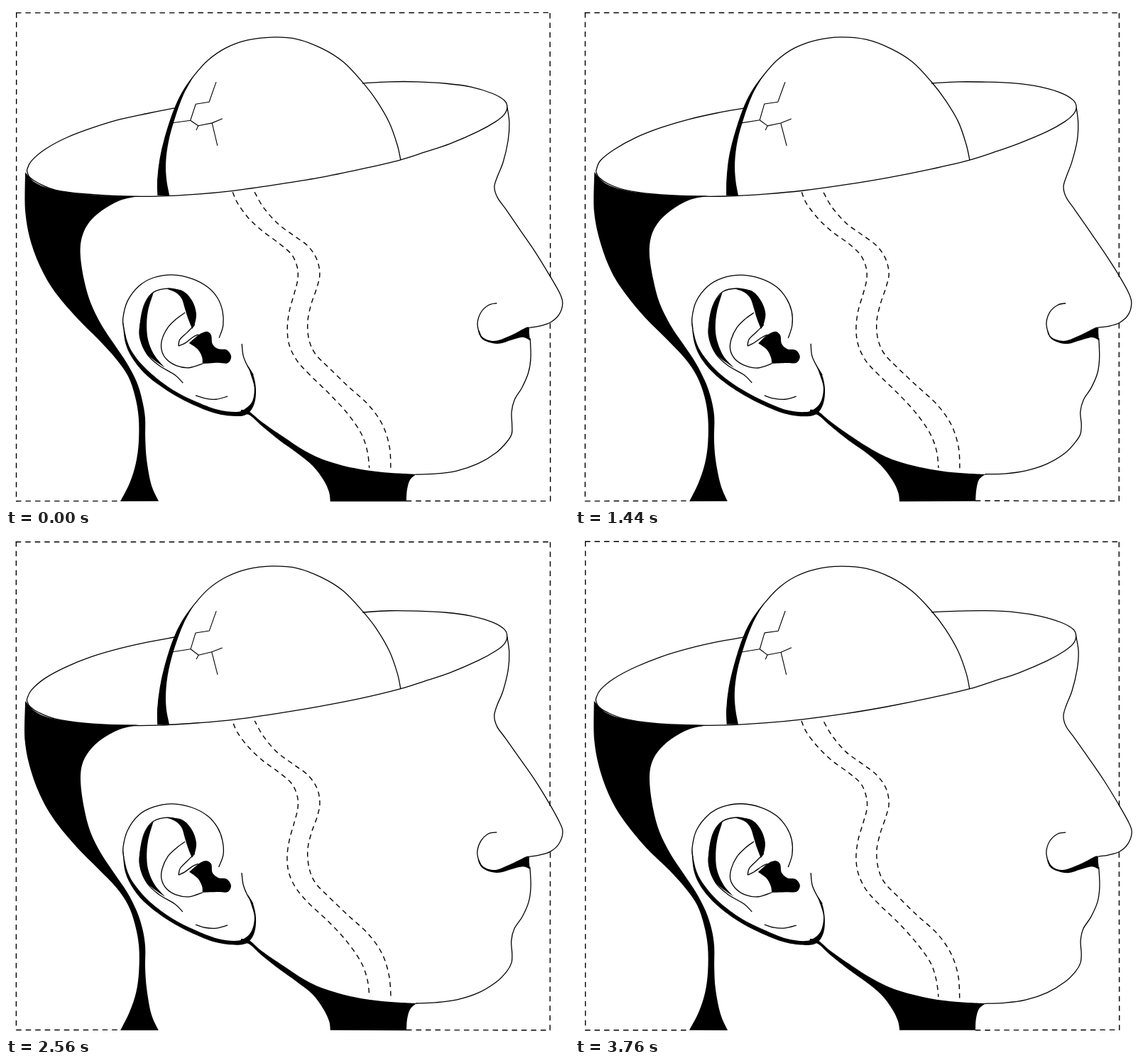
These frames come from a looping animation (793x706 px, 3840 ms). An HTML page with a canvas:

```html
<!DOCTYPE html>
<html lang="en">
<head>
<meta charset="utf-8">
<title>Open head</title>
<style>
html, body { margin: 0; width: 100%; height: 100%; overflow: hidden; background: #fff; }
canvas { display: block; }
</style>
</head>
<body>
<canvas id="stage" width="793" height="706"></canvas>
<script>
const ctx = document.getElementById('stage').getContext('2d');
const STEP = 80, STEPS = 48;

const points = text => text.trim().split(/\s+/).map(p => p.split(',').map(Number));

const lines = [
  // rim of the skull
  '237,144 200,151 160,160 120,172 85,186 55,202 36,218 30,230 30,235 34,242 46,250 70,259 110,265 165,268 215,268 270,265 320,260 380,252 440,242 500,230 555,217 590,206 625,194 665,177 690,163 702,153 706,143 702,133 685,123 655,114 620,109 580,107 540,107 502,109',
  // dome
  '214,267 214,245 217,215 224,185 236,148 248,122 265,98 285,76 310,59 340,48 374,44 410,47 445,60 475,79 502,107 522,133 540,164 551,195 556,217',
  // forehead and nose
  '706,143 709,165 707,190 700,220 692,240 688,255 692,270 704,287 723,314 745,346 765,378 780,405 784,419 779,435 767,446 752,451 737,453',
  // mouth and chin
  '738,468 739,495 736,517 727,538 716,555 712,572 713,590 712,603 705,615 690,630 665,645 635,655 605,659 577,660',
  // nostril
  '691,419 680,421 669,431 664,447 667,463',
  // ear
  '300,468 306,450 305,430 298,412 284,396 262,384 235,379 208,383 187,395 171,416 165,440 166,455',
  '332,476 334,493 340,507 348,520',
  '249,531 238,520 215,506 198,490 189,465 190,440 196,418 208,403 228,398 248,402',
  '252,432 240,441 228,453 220,470 219,485 226,498 240,507 258,510 277,504',
  '266,449 255,460 245,470 243,479',
  '243,479 252,475 263,467 271,463',
  '267,549 280,553 296,554 312,550'
].map(points);

// each solid is a loop of smooth edges that meet in corners
const solids = [
  // back of head and neck
  ['27,234 27,290 36,335 52,375 72,407 100,440 130,470 155,497 172,522 182,550 187,580 187,615 183,645 174,672 161,698',
   '215,698 205,675 198,640 196,610 196,580 192,555 184,530 170,503 152,476 134,449 119,418 110,385 105,350 107,325 117,305 135,288 160,274 187,268',
   '187,268 130,267 90,263 60,257 40,248 27,234'],
  // dome shade
  ['214,267 214,245 217,215 224,185 236,148 248,122 265,98',
   '265,98 250,125 238,157 229,190 225,220 226,245 230,267'],
  // under the jaw
  ['331,569 342,571 360,586 390,607 420,626 450,640 490,651 530,657 578,660',
   '578,660 569,668 565,682 564,698',
   '457,698 455,685 447,668 432,648 410,630 385,612 360,592 342,576 331,577'],
  // under the nose
  ['667,459 671,466 680,471 693,471 715,462 733,453 737,453', '737,453 737,461 738,471',
   '738,471 728,467 712,471 695,476 680,474 669,467 665,455'],
  // ear lobe
  ['164,441 168,475 180,500 200,522 230,544 260,560 295,574 325,578 341,574 350,560 352,540 348,520 340,506',
   '340,506 345,520 350,538 347,556 338,567 325,572 298,569 265,556 234,540 204,518 183,495 171,473 164,441'],
  // ear folds
  ['208,403 196,418 190,440 188,465 198,490 224,510',
   '224,510 210,494 201,475 198,455 200,430 208,403'],
  ['224,398 248,401 262,415 268,433 266,448 262,455',
   '262,455 256,440 252,427 247,412 238,403 224,398'],
  ['258,475 268,466 275,461 283,459 289,464 291,476 299,483 311,485 317,494 312,503 298,503 277,504',
   '277,504 276,495 270,484 258,475']
].map(edges => edges.map(points));

const cracks = [
  '296,107 286,135 267,138 260,161 234,165',
  '260,161 271,169 268,175',
  '271,169 290,165 305,159',
  '290,165 298,197'
].map(points);

const channel = [
  '319,262 326,278 342,299 362,318 384,334 402,350 410,368 411,385 406,405 399,430 396,455 399,478 410,500 428,520 455,546 480,573 500,602 509,627 512,651',
  '350,262 362,283 382,306 405,323 425,338 438,357 442,378 438,397 430,420 425,445 427,470 436,490 455,510 482,536 510,562 530,590 540,622 542,655'
].map(points);

const border = [
  '14,9.5 767,9.5', '14.5,9 14.5,698', '14,697.5 161,697.5', '564,697.5 767,697.5',
  '766.5,10 766.5,382', '766.5,447 766.5,698'
].map(points);

// slow wander of the dashes along each bank
const slide = [[0, 2, 4, 5, 2, 0, -1, 0, 0, 0], [0, 0, -1, 0, 2, 4, 5, 2, 1, 0]];

// small repeatable tremble, tied to the place so that joined lines stay joined
function tremble(x, y, step) {
  const n = Math.sin(x * 12.99 + y * 78.23 + step * 37.72) * 43758.55;
  return (n - Math.floor(n) - 0.5) * 0.6;
}

function wobble(pts, step) {
  return pts.map(([x, y]) => [x + tremble(x, y, step), y + tremble(y, x, step + 0.5)]);
}

// Catmull-Rom curve through the points
function curve(pts, joined) {
  const at = i => pts[Math.max(0, Math.min(pts.length - 1, i))];
  ctx[joined ? 'lineTo' : 'moveTo'](...pts[0]);
  for (let i = 0; i < pts.length - 1; i++) {
    const [a, b, c, d] = [at(i - 1), at(i), at(i + 1), at(i + 2)];
    ctx.bezierCurveTo(
      b[0] + (c[0] - a[0]) / 6, b[1] + (c[1] - a[1]) / 6,
      c[0] - (d[0] - b[0]) / 6, c[1] - (d[1] - b[1]) / 6, c[0], c[1]);
  }
}

function strokeCurve(pts, step) {
  ctx.beginPath();
  curve(wobble(pts, step));
  ctx.stroke();
}

function strokeStraight(pts, step) {
  ctx.beginPath();
  wobble(pts, step).forEach(p => ctx.lineTo(...p));
  ctx.stroke();
}

function fillSolid(edges, step) {
  ctx.beginPath();
  edges.forEach((edge, i) => curve(wobble(edge, step), i > 0));
  ctx.closePath();
  ctx.fill();
}

function draw(step) {
  ctx.fillStyle = '#fff';
  ctx.fillRect(0, 0, 793, 706);
  ctx.fillStyle = ctx.strokeStyle = '#000';
  ctx.lineJoin = 'round';
  ctx.lineCap = 'butt';

  ctx.lineWidth = 1.4;
  ctx.setLineDash([7.5, 6]);
  border.forEach(side => strokeStraight(side, step));

  ctx.setLineDash([7, 5.5]);
  channel.forEach((bank, i) => {
    ctx.lineDashOffset = -slide[i][step % 10];
    strokeCurve(bank, step);
  });
  ctx.setLineDash([]);
  ctx.lineDashOffset = 0;

  ctx.lineWidth = 1.3;
  lines.forEach(line => strokeCurve(line, step));
  ctx.lineWidth = 1.1;
  cracks.forEach(line => strokeStraight(line, step));
  solids.forEach(edges => fillSolid(edges, step));
}

const start = performance.now();
function tick() {
  draw(Math.floor((performance.now() - start) / STEP) % STEPS);
  requestAnimationFrame(tick);
}
tick();
</script>
</body>
</html>
```
